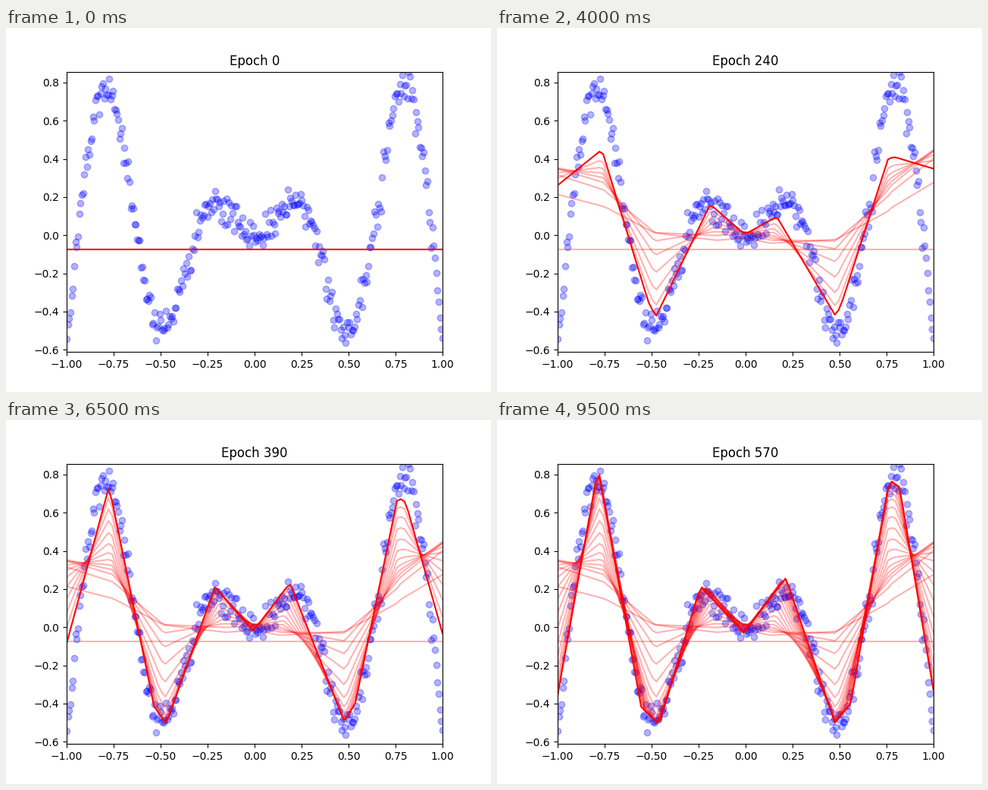
Animation, 640 px wide and 480 px high, one loop 10000 ms. Source, as a matplotlib script:

```python
import matplotlib.pyplot as plt
import numpy as np
from matplotlib.animation import FuncAnimation

FRAMES, INTERVAL, EPOCHS_PER_FRAME = 20, 500, 30
Y_MIN, Y_MAX = -.612, .857
FLAT = -.075

# Frame at which each kind of feature is half learned.
TROUGH, HUMP_L, HUMP_R, PEAK, END = 5, 6, 8.5, 9.7, 12

# Kinks of the fitted curve: x drifts from start to end, while the height
# first eases to an early level and then grows to its final one.
KINKS = [
    # x start, x end, early, final, half learned
    (-1, -1, .39, -.40, END),
    (-.75, -.785, .27, .84, PEAK),
    (-.49, -.555, .11, -.42, TROUGH),
    (-.49, -.46, .11, -.51, TROUGH),
    (-.15, -.24, -.01, .215, HUMP_L),
    (0, -.01, .02, -.03, PEAK),
    (.13, .215, -.03, .26, HUMP_R),
    (.485, .475, .05, -.50, TROUGH),
    (.485, .56, .05, -.40, TROUGH),
    (.755, .765, .23, .78, PEAK),
    (.77, .82, .26, .74, PEAK),
    (1, 1, .49, -.38, END),
]


def samples():
    rng = np.random.default_rng(7)
    x = np.linspace(-1, 1, 300)
    y = x * np.sin(10 * x) + rng.normal(0, .05, x.size)
    return x, y.clip(Y_MIN, Y_MAX)


def prediction(step, x):
    x_start, x_end, early, final, half = np.array(KINKS).T
    kink_x = x_start + (x_end - x_start) * step / (FRAMES - 1)
    warm_up = 1 - np.exp(-step)
    learned = 1 / (1 + np.exp((half - step) / (1 + .12 * half)))
    level = early + (final - early) * learned
    return np.interp(x, kink_x, FLAT + warm_up * (level - FLAT))


fig, ax = plt.subplots(figsize=(6.4, 4.8), dpi=100)
ax.scatter(*samples(), color="blue", alpha=.3)
grid = np.linspace(-1, 1, 100)
curves = [ax.plot(grid, prediction(step, grid), color="red")[0]
          for step in range(FRAMES)]
ax.set_xlim(-1, 1)
ax.set_ylim(Y_MIN, Y_MAX)
title = ax.set_title("Epoch 0")


def update(frame):
    for step, curve in enumerate(curves):
        curve.set_visible(step <= frame)
        curve.set_alpha(1 if step == frame else .3)
    title.set_text(f"Epoch {frame * EPOCHS_PER_FRAME}")
    return [*curves, title]


anim = FuncAnimation(fig, update, frames=FRAMES, interval=INTERVAL,
                     repeat=True, repeat_delay=0)
plt.show()
```
